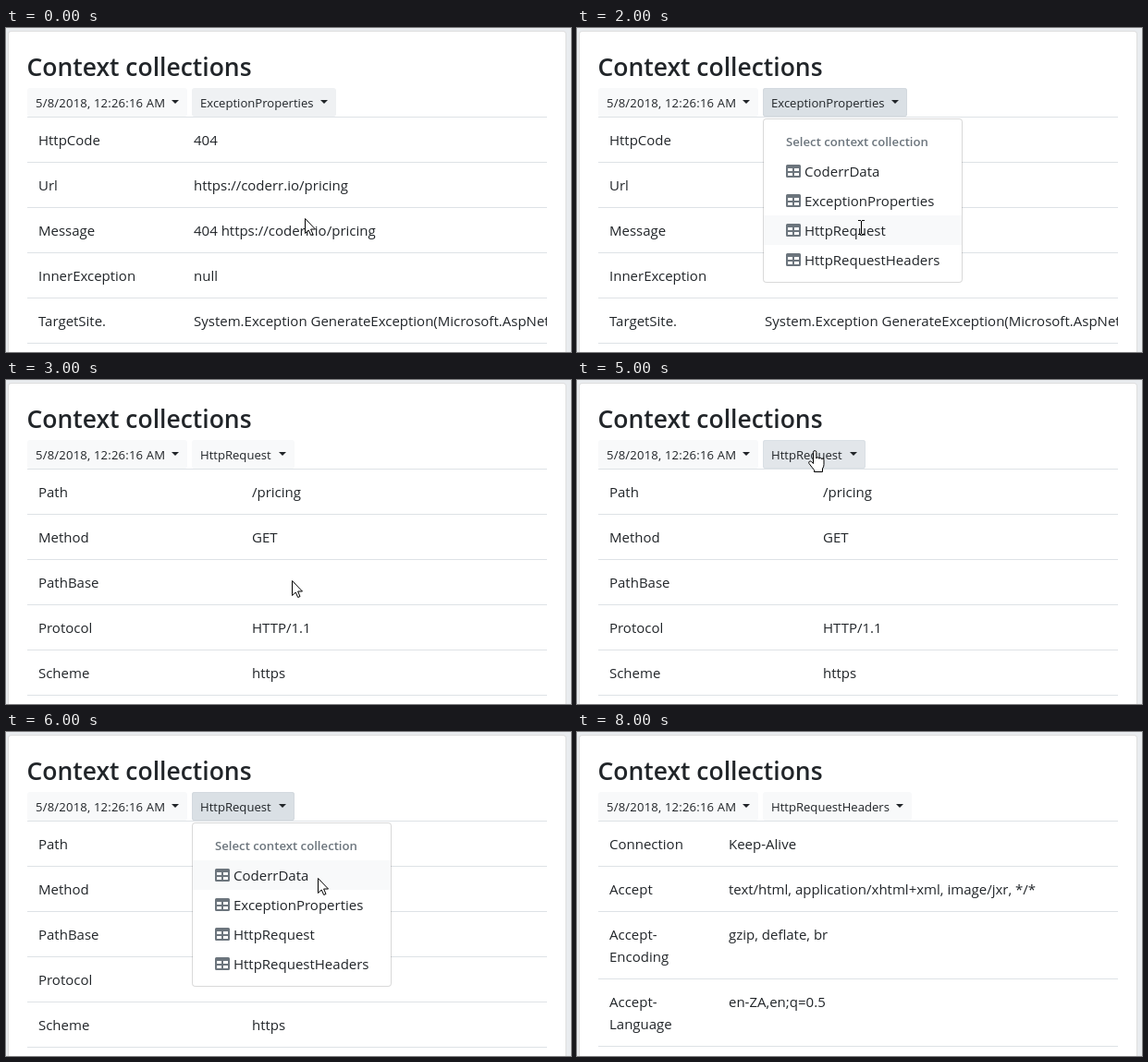
Recreate the animation shown at these times as an HTML page. Size 611 by 351 pixels, loop 9000 ms.

```html
<!DOCTYPE html>
<html lang="en">
<head>
<meta charset="utf-8">
<title>Context collections</title>
<style>
html, body { margin: 0; width: 100%; height: 100%; overflow: hidden; }
body {
  position: relative;
  background: #e9ecef;
  color: #212529;
  font: 15px/24px "Open Sans", "Noto Sans", sans-serif;
  white-space: nowrap;
}
.card, h1, .btn, .table, .menu, .hot, .cursor, .label { position: absolute; box-sizing: border-box; }
.card {
  left: 2px; top: 3px; width: 604px; height: 400px;
  background: #fff; border: 1px solid rgba(0,0,0,.125); border-radius: 4px;
}
h1 { left: 22.5px; top: 24px; margin: 0; font-size: 26.5px; line-height: 36px; font-weight: 600; }

.btn {
  top: 65px; height: 31px;
  background: #f8f9fa; border-radius: 3px;
  font-size: 13.1px; line-height: 20px;
}
.btn::after {
  content: ""; position: absolute; right: 9px; top: 13px;
  border: 4.2px solid transparent; border-top-color: #212529; border-bottom: 0;
}
.label { left: 9px; top: 6px; }
.date { left: 23px; width: 173px; letter-spacing: .18px; }
.pick { left: 201px; animation: pick 9s step-end infinite; }

.table { left: 23px; top: 96px; width: 562px; overflow: hidden; border-bottom: 1px solid #dee2e6; }
.row { display: grid; grid-template-columns: var(--key) auto; padding: 12px; border-top: 1px solid #dee2e6; }

.menu {
  left: 201px; top: 98px; width: 216px; height: 178px;
  background: #fff; background-clip: padding-box;
  border: 1px solid rgba(0,0,0,.15); border-radius: 4px;
  animation: menu 9s step-end infinite;
}
.menu h2 {
  margin: 14px 0 6px 24px;
  font-size: 13.2px; line-height: 20px; font-weight: 600; color: #6c757d;
}
.item { position: relative; height: 32px; padding-left: 44px; line-height: 32px; }
.item svg { position: absolute; left: 24px; top: 8px; width: 16px; height: 16px; fill: #6c757d; }
.hot {
  left: 0; top: 40px; width: 214px; height: 32px; background: #f8f9fa;
  animation: hot 9s step-end infinite;
}

.first { animation: first 9s step-end infinite; }
.second { animation: second 9s step-end infinite; }
.third { animation: third 9s step-end infinite; }

.cursor { left: 0; top: 0; overflow: visible; fill: #fff; stroke: #000; stroke-linejoin: round; }
.arrow { animation: arrow 9s step-end infinite; }
.hand { animation: hand 9s step-end infinite; }
.beam { animation: beam 9s step-end infinite; }

/* one second is 11.1111% of the loop */
@keyframes first { 0% { opacity: 1 } 33.3333%, 100% { opacity: 0 } }
@keyframes second { 0% { opacity: 0 } 33.3333% { opacity: 1 } 88.8888%, 100% { opacity: 0 } }
@keyframes third { 0% { opacity: 0 } 88.8888%, 100% { opacity: 1 } }
@keyframes menu {
  0% { opacity: 0 }
  11.1111% { opacity: 1 }
  33.3333% { opacity: 0 }
  66.6666% { opacity: 1 }
  88.8888%, 100% { opacity: 0 }
}
@keyframes hot {
  0% { opacity: 0 }
  22.2222% { opacity: 1; transform: translateY(64px) }
  33.3333% { opacity: 0 }
  66.6666% { opacity: 1; transform: none }
  77.7777%, 100% { opacity: 1; transform: translateY(96px) }
}
@keyframes pick {
  0% { width: 156px; background: #eff1f3; box-shadow: none }
  11.1111% { width: 156px; background: #dae0e5; box-shadow: inset 0 0 0 1px #d3d9df }
  33.3333% { width: 111px; background: #f8f9fa; box-shadow: none }
  55.5555% { width: 111px; background: #e2e6ea; box-shadow: inset 0 0 0 1px #dae0e5 }
  66.6666% { width: 111px; background: #dae0e5; box-shadow: inset 0 0 0 1px #d3d9df }
  88.8888%, 100% { width: 161px; background: #f8f9fa; box-shadow: none }
}
@keyframes arrow {
  0% { opacity: 1; transform: translate(323px, 206px) }
  11.1111% { opacity: 0 }
  33.3333% { opacity: 1; transform: translate(309px, 217px) }
  44.4444% { opacity: 1; transform: translate(510px, 338px) }
  55.5555% { opacity: 0 }
  66.6666% { opacity: 1; transform: translate(337px, 158px) }
  77.7777%, 100% { opacity: 0 }
}
@keyframes hand {
  0% { opacity: 0 }
  11.1111% { opacity: 1; transform: translate(253px, 91px) }
  22.2222% { opacity: 0 }
  55.5555% { opacity: 1; transform: translate(250px, 76px) }
  66.6666%, 100% { opacity: 0 }
}
@keyframes beam {
  0% { opacity: 0 }
  22.2222% { opacity: 1; transform: translate(304px, 208px) }
  33.3333% { opacity: 0 }
  77.7777% { opacity: 1; transform: translate(314px, 237px) }
  88.8888%, 100% { opacity: 0 }
}
</style>
</head>
<body>
<svg width="0" height="0" style="position:absolute">
  <symbol id="grid" viewBox="0 0 16 16">
    <path fill-rule="evenodd" d="M1.5 1h13A1.5 1.5 0 0 1 16 2.5v11a1.5 1.5 0 0 1-1.5 1.5h-13A1.5 1.5 0 0 1 0 13.5v-11A1.5 1.5 0 0 1 1.5 1zM2 5v3h5V5zM9 5v3h5V5zM2 10v3h5v-3zM9 10v3h5v-3z"/>
  </symbol>
</svg>

<div class="card"></div>
<h1>Context collections</h1>

<div class="table first" style="--key:168px">
  <div class="row"><span>HttpCode</span><span>404</span></div>
  <div class="row"><span>Url</span><span>https://coderr.io/pricing</span></div>
  <div class="row"><span>Message</span><span>404 https://coderr.io/pricing</span></div>
  <div class="row"><span>InnerException</span><span>null</span></div>
  <div class="row"><span>TargetSite.</span><span>System.Exception GenerateException(Microsoft.AspNetCore.Http</span></div>
</div>

<div class="table second" style="--key:231px">
  <div class="row"><span>Path</span><span>/pricing</span></div>
  <div class="row"><span>Method</span><span>GET</span></div>
  <div class="row"><span>PathBase</span><span></span></div>
  <div class="row"><span>Protocol</span><span>HTTP/1.1</span></div>
  <div class="row"><span>Scheme</span><span>https</span></div>
</div>

<div class="table third" style="--key:129px">
  <div class="row"><span>Connection</span><span>Keep-Alive</span></div>
  <div class="row"><span>Accept</span><span>text/html, application/xhtml+xml, image/jxr, */*</span></div>
  <div class="row"><span>Accept-<br>Encoding</span><span>gzip, deflate, br</span></div>
  <div class="row"><span>Accept-<br>Language</span><span>en-ZA,en;q=0.5</span></div>
</div>

<div class="btn date"><span class="label">5/8/2018, 12:26:16 AM</span></div>
<div class="btn pick">
  <span class="label first">ExceptionProperties</span>
  <span class="label second">HttpRequest</span>
  <span class="label third">HttpRequestHeaders</span>
</div>

<div class="menu">
  <div class="hot"></div>
  <h2>Select context collection</h2>
  <div class="item"><svg><use href="#grid"/></svg>CoderrData</div>
  <div class="item"><svg><use href="#grid"/></svg>ExceptionProperties</div>
  <div class="item"><svg><use href="#grid"/></svg>HttpRequest</div>
  <div class="item"><svg><use href="#grid"/></svg>HttpRequestHeaders</div>
</div>

<svg class="cursor arrow" width="12" height="19">
  <path d="M.5 .5V16.5L4.2 13L6.7 18.5L9 17.5L6.6 12H11.5Z"/>
</svg>
<svg class="cursor hand" width="18" height="25">
  <path d="M5.5 14.5V2.3a1.7 1.7 0 0 1 3.4 0V9q0-1.2 1.4-1.2 1.5 0 1.6 1.5.2-1 1.3-1 1.4 0 1.5 1.6.3-.7 1-.7 1.3 0 1.3 1.6V15.5q0 2.5-1.5 4.5V23.5H6.5V21.5Q4 18.5 1 14.5.2 13 1.3 12.2 2.5 11.5 3.8 12.7Z"/>
</svg>
<svg class="cursor beam" width="7" height="16">
  <path d="M0 .5H3M4 .5H7M3.5 1V15M0 15.5H3M4 15.5H7"/>
</svg>
</body>
</html>
```
